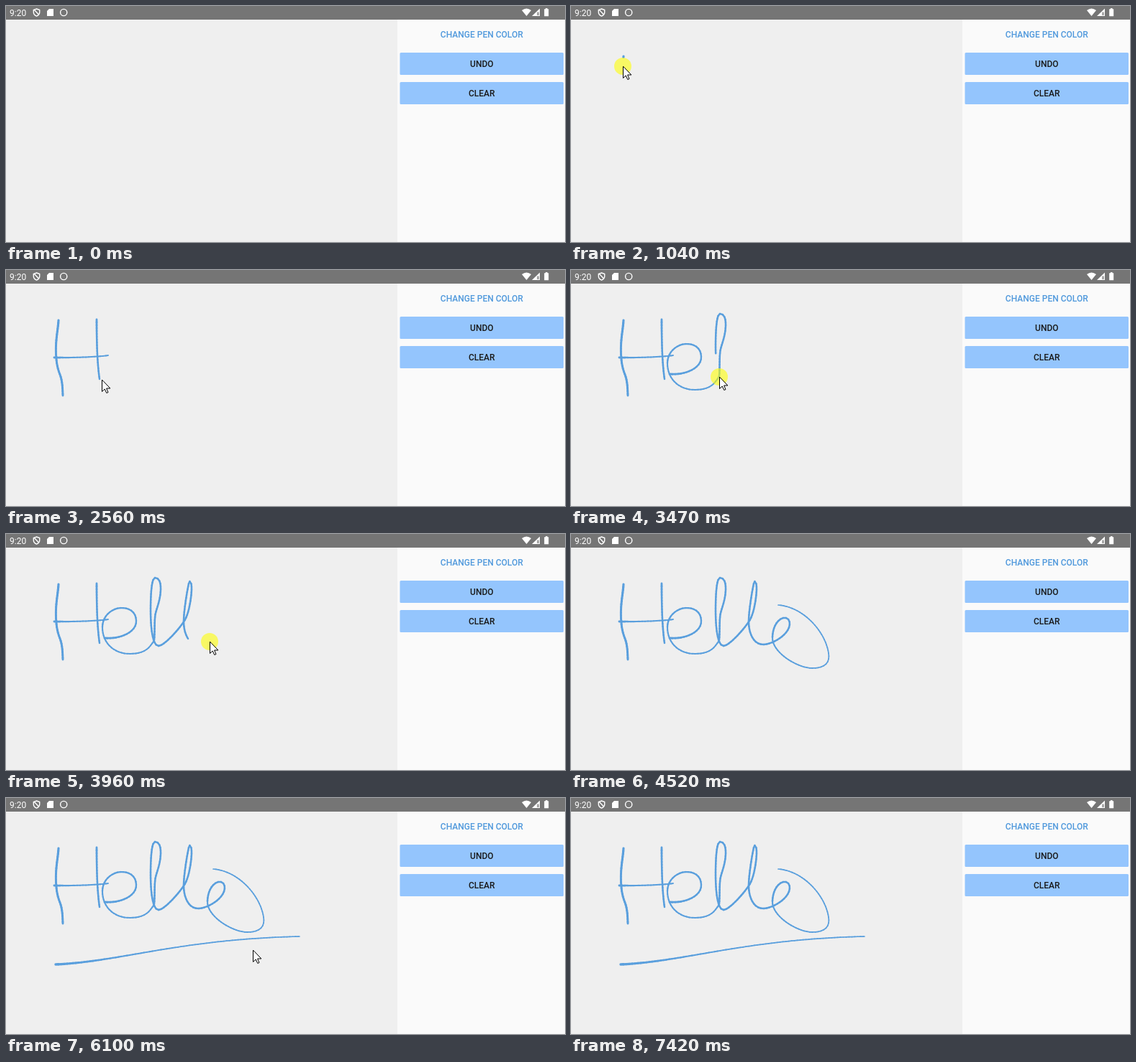
These frames come from a looping animation (777 px wide and 329 px high, 8000 ms). An HTML page with a canvas:

```html
<!DOCTYPE html>
<html lang="en">
<head>
<meta charset="utf-8">
<title>Drawing pad</title>
<style>
  html, body { margin: 0; width: 100%; height: 100%; overflow: hidden; background: #efefef; }
  svg, canvas { position: absolute; left: 0; top: 0; }
  text { font: 450 12px Roboto, sans-serif; text-anchor: middle; fill: #1a1a1a; }
  .clock { font-weight: 400; text-anchor: start; fill: #fff; }
  .link { fill: #5099dc; }
</style>
</head>
<body>
<svg width="777" height="329">
  <rect x="544" width="233" height="329" fill="#fafafa"/>
  <rect width="777" height="19" fill="#757575"/>
  <text class="clock" x="5" y="14">9:20</text>
  <g fill="none" stroke="#fff" stroke-width="1.4">
    <path d="M42.500 4l4.200 1.500v3.200q0 3.600-4.200 5.400q-4.200-1.800-4.200-5.400V5.500zM39 5l7 7.500"/>
    <circle cx="80.200" cy="9" r="4.600"/>
  </g>
  <g fill="#fff">
    <path d="M60 4h6v10h-9V7z"/>
    <path d="M717 6q6.500-5 13 0l-6.500 8z"/>
    <path d="M742 3.500v10.500h-11z"/>
    <path d="M738 8.500h3v4.500h-3z" fill="#a8a8a8"/>
    <path d="M750 3h2.500v1.200h1.700v10h-6v-10h1.800z"/>
  </g>
  <text class="link" x="661.300" y="44.300">CHANGE PEN COLOR</text>
  <g fill="#94c5fd">
    <rect x="547.500" y="65" width="227.500" height="31" rx="1.500"/>
    <rect x="547.500" y="106" width="227.500" height="31" rx="1.500"/>
  </g>
  <text x="661.300" y="85.300">UNDO</text>
  <text x="661.300" y="126.300">CLEAR</text>
</svg>
<canvas width="777" height="329"></canvas>
<script>
const LOOP = 8000, STEP = 69.15, SPACING = 4;
const ctx = document.querySelector('canvas').getContext('2d');
const arrow = new Path2D('M.5 .5V16.500L4.200 13L6.800 18.500L9 17.500L6.600 12H11.500Z');

// A pointer trip along a path; progress is the time share to the power of ease.
function move(start, end, d, ease = 1) {
  const path = document.createElementNS('http://www.w3.org/2000/svg', 'path');
  path.setAttribute('d', d);
  return { start, end, path, ease, length: path.getTotalLength() };
}

// A trip with the pen down; the line soon thins from one width to the other.
function pen(start, end, from, to, d, ease) {
  return { ...move(start, end, d, ease), from, to };
}

const trips = [
  move(135, 700, 'M499 280Q200 130 73 69', .7),
  // H
  pen(960, 1530, 3.2, 2.9, 'M73 70C72.500 80 70 92 69.500 105S70 133 74 143S78.500 160 79 175'),
  move(1530, 1795, 'M79 175V183L72 123'),
  pen(1930, 2200, 3.2, 1.9, 'M67 122C95 122.500 130 121 142 119'),
  move(2200, 2270, 'M142 119L126 69'),
  pen(2270, 2480, 2.9, 2.5, 'M126 69C126 95 126.500 128 130 152'),
  move(2480, 2550, 'M130 152L133 153'),
  // ello
  pen(2620, 2910, 2.9, 2.3, 'M137 145C158 147 181 137 181 122S170 103 160 103S134 112 134 130'),
  pen(2910, 3080, 2.1, 2, 'M134 130C134 152 150 167 172 167S200 158 206 148'),
  pen(3080, 4110, 2.5, 2.5, 'M206 148C207 135 206 118 208 110S214.500 92 215 78S211 61 207 61' +
    'S201 80 201 106S204 156 212 156S241 132 248 121S258 85 258 76S256 66 255 66' +
    'S247 105 247 122S254 154 267 154S304 140 304 125S281 115 280 144'),
  pen(4110, 4400, 2.1, 1.7, 'M280 144C279 165 315 187 335 187S360 178 358 166C354 138 325 102 288 99'),
  move(4400, 4520, 'M288 99L500 430'),
  // underline
  move(5110, 5440, 'M453 299Q200 262 69 232', .8),
  pen(5440, 5890, 3.5, 1.7, 'M69 232C160 228 240 197 408 193', 1.6),
  move(5890, 6080, 'M408 193L343 212'),
  move(6100, 6720, 'M343 212C90 280 220 370 685 147'),
  move(6720, 6790, 'M685 147L683 133'),
  move(6990, 7390, 'M683 133Q711 230 711 345'),
];

function distance({ start, end, ease, length }, time) {
  const share = Math.max(0, Math.min(1, (time - start) / (end - start)));
  return length * share ** ease;
}

function drawInk(trip, time) {
  const reach = distance(trip, time), { path, from, to } = trip;
  let last = path.getPointAtLength(0);
  for (let s = SPACING; s < reach + SPACING; s += SPACING) {
    const at = Math.min(s, reach), point = path.getPointAtLength(at);
    ctx.lineWidth = to + (from - to) * (1 - at / trip.length) ** 4;
    ctx.beginPath();
    ctx.moveTo(last.x, last.y);
    ctx.lineTo(point.x, point.y);
    ctx.stroke();
    last = point;
  }
}

function drawPointer(trip, time) {
  const { x, y } = trip.path.getPointAtLength(distance(trip, time));
  ctx.save();
  ctx.translate(Math.round(x), Math.round(y));
  if (trip.from) {
    ctx.fillStyle = 'rgba(255, 255, 0, .58)';
    ctx.beginPath();
    ctx.arc(0, 0, 12, 0, 2 * Math.PI);
    ctx.fill();
  }
  ctx.fillStyle = '#fff';
  ctx.strokeStyle = '#000';
  ctx.lineWidth = 1;
  ctx.fill(arrow);
  ctx.stroke(arrow);
  ctx.restore();
}

function frame(now) {
  const time = Math.floor(now % LOOP / STEP) * STEP;
  const inkTime = time - STEP; // ink trails the pointer by one step
  ctx.clearRect(0, 0, 777, 329);
  ctx.strokeStyle = '#5a9fdd';
  ctx.lineCap = 'round';
  for (const trip of trips) {
    if (trip.from && inkTime > trip.start) drawInk(trip, inkTime);
  }
  const current = trips.findLast(trip => trip.start <= time);
  if (current) drawPointer(current, time);
  requestAnimationFrame(frame);
}
requestAnimationFrame(frame);
</script>
</body>
</html>
```
